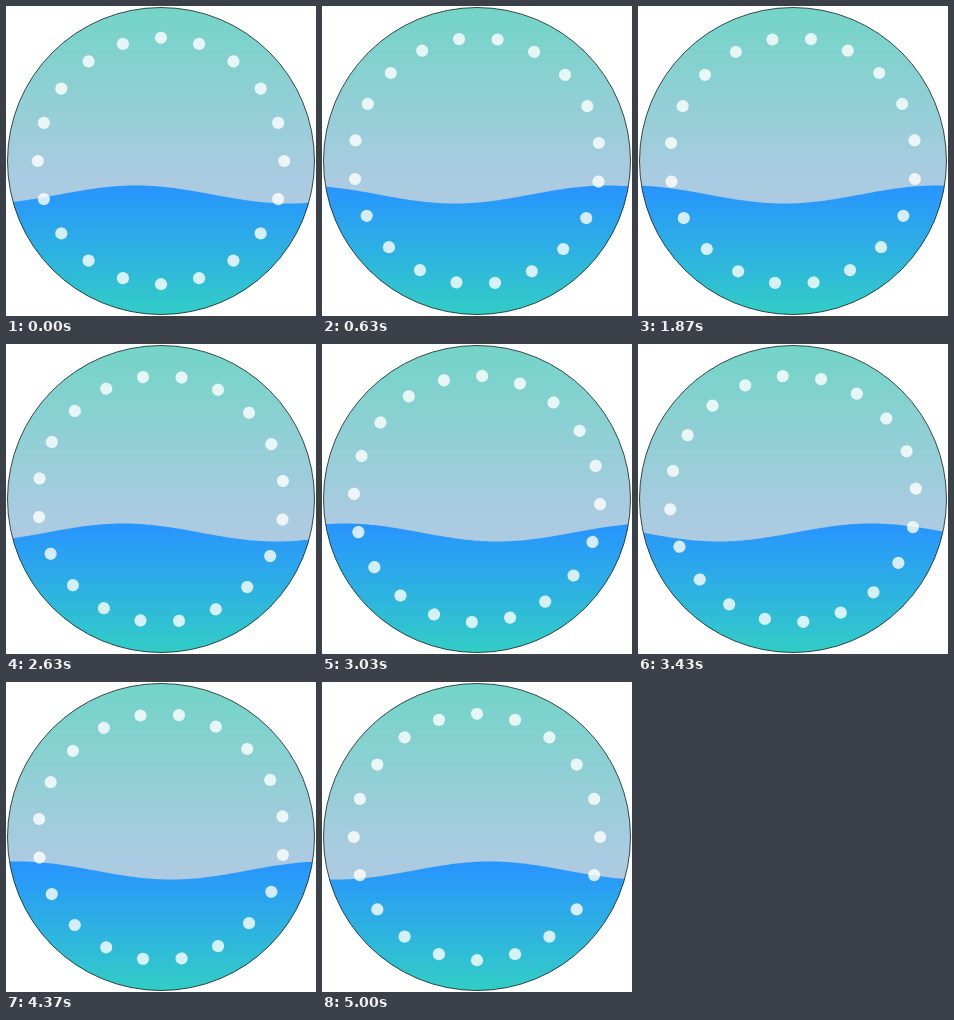
An HTML page for the animation above (5060 ms loop, 310 by 310 pixels).

```html
<!DOCTYPE html>
<html lang="en">
<head>
<meta charset="utf-8">
<title>Water gauge</title>
<style>
  html, body { margin: 0; width: 100%; height: 100%; overflow: hidden; background: #fff; }
  svg { display: block; width: 100vw; height: 100vh; }
</style>
</head>
<body>
<svg viewBox="0 0 310 310">
  <defs>
    <linearGradient id="sky" gradientUnits="userSpaceOnUse" x1="0" y1="2" x2="0" y2="198">
      <stop offset="0" stop-color="#74d4c8"/>
      <stop offset=".12" stop-color="#7ad3cb"/>
      <stop offset=".85" stop-color="#a9cbe0"/>
      <stop offset="1" stop-color="#adcbe2"/>
    </linearGradient>
    <linearGradient id="sea" gradientUnits="userSpaceOnUse" x1="0" y1="180" x2="0" y2="308">
      <stop offset="0" stop-color="#2894ff"/>
      <stop offset="1" stop-color="#32cdc6"/>
    </linearGradient>
    <clipPath id="disc"><circle cx="155" cy="155" r="153.5"/></clipPath>
  </defs>
  <circle cx="155" cy="155" r="153.5" fill="url(#sky)"/>
  <path id="water" fill="url(#sea)" clip-path="url(#disc)"/>
  <circle cx="155" cy="155" r="153.5" fill="none" stroke="#102020" stroke-width=".8"/>
  <g id="dots" fill="#fff" fill-opacity=".8"></g>
</svg>
<script>
  const LOOP = 5060, STEP = 100 / 3, LAST_STEP = 150;
  const CENTER = 155, RING = 123.2, DOT_COUNT = 20;
  const WAVE = { level: 188.5, height: 9, length: 306, period: 1290, crest: 130 };
  const water = document.getElementById('water');
  const dots = document.getElementById('dots');

  for (let i = 0; i < DOT_COUNT; i++) {
    const angle = i / DOT_COUNT * 2 * Math.PI;
    const dot = document.createElementNS('http://www.w3.org/2000/svg', 'circle');
    dot.setAttribute('cx', CENTER + RING * Math.sin(angle));
    dot.setAttribute('cy', CENTER - RING * Math.cos(angle));
    dot.setAttribute('r', 6.1);
    dots.append(dot);
  }

  function wavePath(time) {
    const crest = WAVE.crest - WAVE.length * time / WAVE.period;
    let path = 'M0 310';
    for (let x = 0; x <= 310; x += 2) {
      const y = WAVE.level - WAVE.height * Math.cos(2 * Math.PI * (x - crest) / WAVE.length);
      path += `L${x} ${y.toFixed(2)}`;
    }
    return path + 'L310 310Z';
  }

  function render(elapsed) {
    // The picture advances 30 times a second, on 10 ms ticks, and rests on the last step.
    const step = Math.min(LAST_STEP, Math.floor((elapsed % LOOP + 5) / STEP));
    const time = step * STEP;
    water.setAttribute('d', wavePath(time));
    dots.setAttribute('transform', `rotate(${time * 0.072} ${CENTER} ${CENTER})`);
  }

  const start = performance.now();
  function tick() {
    render(performance.now() - start);
    requestAnimationFrame(tick);
  }
  tick();
</script>
</body>
</html>
```
